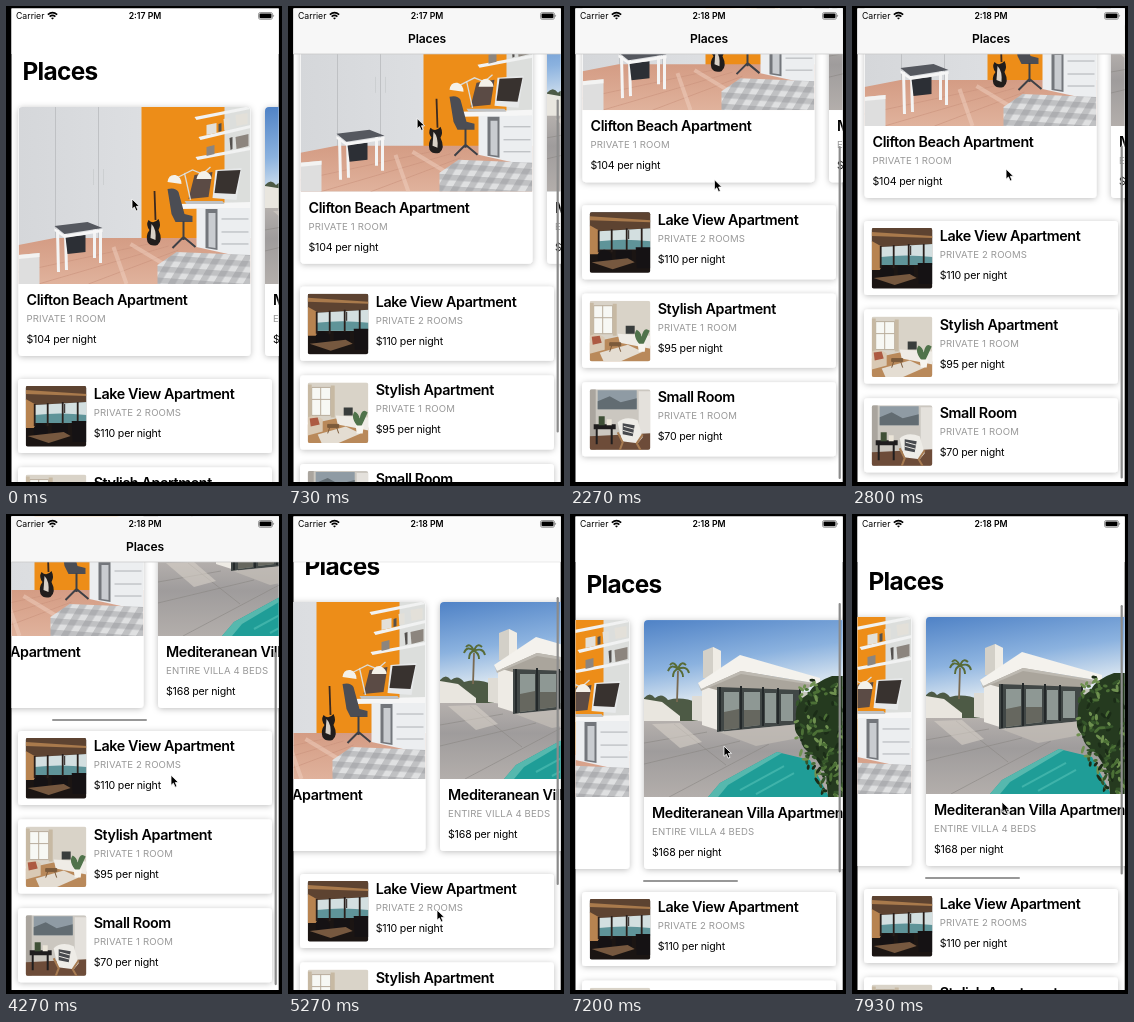
Animation of 276x480 px, one loop 8000 ms. Source, as an HTML page:

```html
<!DOCTYPE html>
<html lang="en">
<head>
<meta charset="utf-8">
<title>Places</title>
<style>
html, body { margin: 0; width: 100%; height: 100%; overflow: hidden; background: #000; }
svg { display: block; width: 276px; height: 480px; }
text { font-family: Inter, "Liberation Sans", sans-serif; dominant-baseline: alphabetic; }
.large { font-size: 24.4px; font-weight: 700; letter-spacing: -.7px; }
.name { font-size: 14.3px; font-weight: 600; letter-spacing: -.38px; }
.kind { font-size: 9.6px; fill: #999; letter-spacing: .13px; }
.price { font-size: 10.6px; letter-spacing: -.18px; }
.bar { font-size: 12.1px; font-weight: 600; letter-spacing: -.15px; text-anchor: middle; }
.status { font-size: 8.7px; }
</style>
</head>
<body>
<svg viewBox="0 0 276 480">
  <defs>
    <clipPath id="screen"><rect x="5.5" y="2.5" width="267.2" height="473.5"/></clipPath>
    <clipPath id="photo"><path d="M0 177V4Q0 0 4 0H228Q232 0 232 4V177Z"/></clipPath>
    <clipPath id="thumb"><rect width="60.5" height="60.5" rx="2"/></clipPath>
    <filter id="shadow" x="-10%" y="-20%" width="120%" height="140%">
      <feDropShadow dx="0" dy="1" stdDeviation="3.3" flood-opacity=".26"/>
    </filter>
    <linearGradient id="sky" x2=".2" y2="1">
      <stop stop-color="#4f82c6"/><stop offset=".28" stop-color="#8bb2df"/><stop offset=".5" stop-color="#e2ebf2"/>
    </linearGradient>
    <linearGradient id="patio" x2="0" y2="1">
      <stop stop-color="#b5b0ad"/><stop offset=".4" stop-color="#9f9c9c"/><stop offset="1" stop-color="#b3aeab"/>
    </linearGradient>
    <linearGradient id="wall" x2="1" y2="0">
      <stop stop-color="#d5d7da"/><stop offset="1" stop-color="#e3e5e8"/>
    </linearGradient>
    <linearGradient id="floor" x2="0" y2="1">
      <stop stop-color="#d49c84"/><stop offset="1" stop-color="#e0b29c"/>
    </linearGradient>
    <pattern id="checks" width="15" height="11" patternUnits="userSpaceOnUse" patternTransform="skewX(-28) rotate(4)">
      <rect width="15" height="11" fill="#dfe0e1"/>
      <path d="M0 0H7.5V11H0Z" fill="#8d8f94" fill-opacity=".38"/>
      <path d="M0 0H15V5.5H0Z" fill="#8d8f94" fill-opacity=".38"/>
    </pattern>

    <g id="room" clip-path="url(#photo)">
      <rect width="232" height="177" fill="url(#wall)"/>
      <path d="M37 0V133M80 0V132" stroke="#bfc1c4"/>
      <path d="M75 62V78M85 62V78" stroke="#cccfd1"/>
      <path d="M123 0H208V135H123Z" fill="#ed8d18"/>
      <path d="M206 0H232V130H206Z" fill="#dcdedc"/>
      <path d="M0 138L36 131H232V177H0Z" fill="url(#floor)"/>
      <path d="M0 165L130 137M20 177L150 139M70 177L160 143" stroke="#c9937c" stroke-width=".6"/>
      <path d="M95 140L108 177M112 137L150 160" stroke="#efd0c0" stroke-width="4" opacity=".5"/>
      <path d="M0 148L21 146V177H0Z" fill="#dedede"/><path d="M0 148L21 146V150L0 152Z" fill="#f3f3f2"/>
      <path d="M176 10L232 -1V2L178 13Z M180 30L232 18V21L182 33Z M177 50L232 40V43L179 53Z" fill="#f1f2f2"/>
      <path d="M188 18L198 16V26L188 28Z M205 12L211 11V22L206 23Z M217 8L229 6V17L218 19Z" fill="#e3e0d9"/>
      <path d="M188 40L196 38V47L188 49Z M217 30L230 27V39L218 42Z" fill="#8c857e"/>
      <path d="M200 17L203 16V24L200 25Z M211 31L214 30V42L212 43Z" fill="#54514e"/>
      <path d="M136 84L137 113" stroke="#3c2a20" stroke-width="1.8"/>
      <path d="M130 113Q135 118 140 112Q143 118 140 123Q145 133 139 138Q132 140 129 135Q127 128 131 123Q127 118 130 113Z" fill="#211d1c"/>
      <path d="M133 117Q138 122 137 133L132 131Z" fill="#d8d0c6"/>
      <path d="M160 97L232 95V101L160 102Z" fill="#f6f6f6"/>
      <path d="M178 101H232V152L178 140Z" fill="#eceef0"/>
      <path d="M187 102H199V143L187 141Z" fill="#73767b"/>
      <path d="M190 106H197V141L190 140Z" fill="#c9ccd0"/>
      <path d="M203 112H230M203 125H230M203 137H230" stroke="#aeb1b5"/>
      <path d="M197 63L223 61L218 93L194 91Z" fill="#e7e9ea"/>
      <path d="M199 64L222 63L217 87L196 86Z" fill="#38322f"/>
      <path d="M176 68L194 65L190 90L170 92Z" fill="#5b4b45"/>
      <path d="M166 94H204L206 97H168Z" fill="#c0c2c4"/>
      <path d="M149 82Q157 80 160 85L166 107L174 109V115H157L153 107Z" fill="#4b4d54"/>
      <path d="M165 114V133M165 130L154 141M165 130L177 140" stroke="#3e4046" stroke-width="2"/>
      <path d="M156 72L174 63L184 67L192 60M166 66L172 93" fill="none" stroke="#dcdcd8" stroke-width="1.3"/>
      <path d="M149 75Q150 67 157 68Q163 70 163 77Z M178 72Q180 63 187 64Q193 67 193 72Z" fill="#f4f1e9"/>
      <path d="M39 123L40 165M47 127L48 163M76 120V151M82 123V156" stroke="#f4f4f4" stroke-width="3"/>
      <path d="M47 130L67 128V145L49 147Z" fill="#2c2f35"/>
      <path d="M36 119L69 115L84 121L46 127Z" fill="#55585f"/>
      <path d="M36 121L46 128L84 122V125L46 131L36 124Z" fill="#f6f6f6"/>
      <path d="M139 158L158 145L232 148V177H139Z" fill="url(#checks)"/>
    </g>

    <g id="villa" clip-path="url(#photo)">
      <rect width="232" height="177" fill="url(#sky)"/>
      <path d="M0 78Q6 71 11 78Q18 72 24 80Q38 76 54 83V102H0Z" fill="#4d5a45"/>
      <path d="M0 79L18 82L36 96V103H0Z" fill="#e9e6df"/>
      <path d="M34 51L33 82" stroke="#7a6a52" stroke-width="1.8"/>
      <path d="M34 49Q27 43 24 51M34 49Q30 40 26 45M34 49Q37 40 42 45M34 49Q43 45 45 53M34 49Q29 50 29 57M34 49Q39 51 39 57" fill="none" stroke="#586b37" stroke-width="1.9"/>
      <path d="M59 31L69 27L77 31V58H59Z" fill="#d3d0c8"/><path d="M69 27L77 31V55H69Z" fill="#efece5"/>
      <path d="M0 101H232V177H0Z" fill="url(#patio)"/>
      <path d="M155 72H190V103H155Z" fill="#c9c9c2"/>
      <path d="M48 76H62V102L48 100Z" fill="#dfdcd5"/>
      <path d="M58 66H80V112L58 105Z" fill="#eeebe5"/>
      <path d="M58 66L97 50L170 65L158 71H76Z" fill="#aaa59c"/>
      <path d="M73 67L156 70V104L73 112Z" fill="#414746"/>
      <path d="M80 72H95V108L80 110Z M100 72H116V105L100 107Z M121 73H132V103H121Z M137 74H149V101H137Z" fill="#8e9894"/>
      <path d="M80 92L95 89V108L80 110Z M100 90H116V105L100 107Z" fill="#66675f"/>
      <path d="M76 67V111M97 66V109M119 67V106M134 68V104M156 69V104" stroke="#24292a" stroke-width="2"/>
      <path d="M54 63L96 35L176 58V64L97 51L57 69Z" fill="#f4f2ed"/>
      <path d="M54 63L57 69L97 51L176 64V66L97 54L57 71Z" fill="#bdb9b1"/>
      <path d="M0 123L63 112M0 144L96 121M25 177L125 124M30 104L82 145" stroke="#8a8684" stroke-width=".6"/>
      <path d="M8 104L36 103L58 122L36 128Z" fill="#d8d1c9" opacity=".6"/>
      <path d="M75 112L156 104L160 117L112 126Z" fill="#c5bfb8" opacity=".7"/>
      <path d="M64 177L76 163L133 132L166 140L185 177Z" fill="#1f9d97"/>
      <path d="M64 177L76 163L133 132L138 133L84 165L74 177Z" fill="#56b8ae"/>
      <path d="M96 170L140 146M112 174L150 153" stroke="#3fb3aa" stroke-width="2"/>
      <path d="M188 56Q170 62 164 74Q150 82 152 98Q148 112 157 118Q156 128 170 136Q176 146 182 154L184 177H232V56Z" fill="#253a1f"/>
      <g id="leaves"></g>
    </g>

    <g id="lake" clip-path="url(#thumb)">
      <rect width="61" height="61" fill="#1b1513"/>
      <path d="M0 0H61V16L9 19L0 14Z" fill="#5d4331"/>
      <path d="M0 4L61 8V10L0 8Z" fill="#a97a4c"/>
      <path d="M9 19L61 16V37H9Z" fill="#d3dfe0"/>
      <path d="M9 29Q34 26 61 29V37H9Z" fill="#5f9499"/>
      <path d="M0 13L9 18V42H0Z" fill="#b78350"/>
      <path d="M9 18V40M22 17V40M37 16V40M52 16V40" stroke="#291f1b" stroke-width="1.8"/>
      <path d="M8 42Q14 33 22 42V51H8Z M26 38H42V50H26Z M46 35H61V56H47Z" fill="#151214"/>
      <path d="M2 50L38 46L45 50L23 57Z" fill="#76583f"/>
      <path d="M39 18V27" stroke="#211815"/>
    </g>

    <g id="stylish" clip-path="url(#thumb)">
      <rect width="61" height="61" fill="#d9d3c8"/>
      <path d="M4 5H23V33H4Z" fill="#f7f8f4"/><path d="M4 5H23V33H4ZM13 5V33M4 17H23" fill="none" stroke="#b9ad9c"/>
      <path d="M0 2H4V40H0Z M23 3H27V35H23Z" fill="#c7b9a3"/>
      <path d="M0 42L28 36L61 45V61H0Z" fill="#b9895a"/>
      <path d="M10 52L38 44L53 51L30 61H14Z" fill="#e4ddd2"/>
      <path d="M0 35Q8 31 15 37V49L0 53Z" fill="#d9c9b4"/><path d="M2 36L10 35L12 42L3 44Z" fill="#ad5a42"/>
      <path d="M28 33L61 35V48L30 42Z" fill="#efece6"/><path d="M36 25H45V33H36Z" fill="#393d3c"/>
      <path d="M51 45Q42 35 47 29Q51 31 52 36Q54 25 60 30Q56 39 53 45Z" fill="#50734b"/>
      <path d="M48 43H56L55 51H49Z" fill="#f7f5ef"/>
      <path d="M20 42H31V45H20ZM22 45L20 51M29 45L31 51" fill="#7b5a3b" stroke="#7b5a3b"/>
    </g>

    <g id="small" clip-path="url(#thumb)">
      <rect width="61" height="61" fill="#cbc7c0"/>
      <path d="M0 0H6V61H0Z" fill="#aaa59e"/>
      <path d="M8 1H47V20H8Z" fill="#8f9ba4"/><path d="M8 12L20 7L31 13L47 9V20H8Z" fill="#626c72"/>
      <path d="M49 2H61V48H49Z" fill="#e4e1dc"/>
      <path d="M0 47L61 44V61H0Z" fill="#6d4c39"/>
      <path d="M5 36H25V39H5ZM7 39V55M22 39V55" fill="#1f1d1e" stroke="#1f1d1e" stroke-width="2"/>
      <path d="M9 27H15V36H9Z" fill="#3f5037"/><path d="M17 30H22V36H17Z" fill="#ebe5d8"/>
      <path d="M28 33Q36 26 48 31L53 48L48 54L32 52Z" fill="#eeece7"/>
      <path d="M33 34L45 36L43 47L33 45Z" fill="#47494d"/><path d="M34 37L45 40M33 41L44 44" stroke="#e7e5e0"/>
      <path d="M28 43L33 53L30 61M53 45L47 54L51 61" fill="none" stroke="#a77b51" stroke-width="2"/>
    </g>
  </defs>

  <rect width="276" height="480"/>
  <g clip-path="url(#screen)">
    <rect x="5" y="2" width="268" height="474" fill="#fff"/>
    <g id="page">
      <text class="large" x="16.5" y="74">Places</text>
      <g id="cards"></g>
      <rect id="hbar" y="361" width="95" height="2" rx="1" fill="#979797"/>
      <g id="rows"></g>
    </g>
    <rect id="vbar" x="268.6" width="2.2" rx="1.1" fill="#8b8b8b"/>
    <rect x="5" y="2" width="268" height="46" fill="#fff"/>
    <g id="nav">
      <rect x="5" y="2" width="268" height="46" fill="#f7f7f7"/>
      <path d="M5 48H273" stroke="#c4c4c4" stroke-width=".7"/>
    </g>
    <text id="navTitle" class="bar" x="139" y="36.5">Places</text>
    <text class="status" x="10" y="13">Carrier</text>
    <path d="M41.8 8.6Q46.5 4.6 51.2 8.6M43.6 10.6Q46.5 8.2 49.4 10.6" fill="none" stroke="#000" stroke-width="1.5"/>
    <path d="M45 12L46.5 13.6L48 12Q46.5 10.8 45 12Z"/>
    <text id="clock" class="status" x="139" y="13" text-anchor="middle" font-weight="600"></text>
    <rect x="252.5" y="6.5" width="14" height="6.8" rx="1.8" fill="#fff" stroke="#555" stroke-width=".6"/>
    <rect x="253.5" y="7.5" width="12" height="4.8" rx="1"/>
    <path d="M267.4 8.6Q269 9.9 267.4 11.2Z" fill="#555"/>
  </g>
  <path id="cursor" d="M0 0V10.2L2.4 8L4.1 12L6 11.2L4.3 7.3H7.5Z" stroke="#fff" stroke-width=".8"/>
</svg>
<script>
const $ = id => document.getElementById(id);
const LOOP = 8000;
const clamp = v => Math.max(0, Math.min(1, v));
const set = (id, attributes) => {
  for (const [key, value] of Object.entries(attributes)) $(id).setAttribute(key, value);
};

const label = (x, y, name, kind, price) => `
  <text class="name" x="${x}" y="${y}">${name}</text>
  <text class="kind" x="${x}" y="${y + 17}">${kind}</text>
  <text class="price" x="${x}" y="${y + 38}">$${price} per night</text>`;

const card = (x, art, ...info) => `<g transform="translate(${x} 101)">
  <rect width="232" height="249" rx="4" fill="#fff" filter="url(#shadow)"/>
  <use href="#${art}"/>${label(8, 198, ...info)}</g>`;

const row = (i, art, ...info) => `<g transform="translate(12 ${373 + i * 88.6})">
  <rect width="254" height="74" rx="3.5" fill="#fff" filter="url(#shadow)"/>
  <use href="#${art}" x="7.7" y="7"/>${label(75.7, 20, ...info)}</g>`;

$('cards').innerHTML =
  card(12.5, 'room', 'Clifton Beach Apartment', 'PRIVATE 1 ROOM', 104) +
  card(259, 'villa', 'Mediteranean Villa Apartment', 'ENTIRE VILLA 4 BEDS', 168);
$('rows').innerHTML =
  row(0, 'lake', 'Lake View Apartment', 'PRIVATE 2 ROOMS', 110) +
  row(1, 'stylish', 'Stylish Apartment', 'PRIVATE 1 ROOM', 95) +
  row(2, 'small', 'Small Room', 'PRIVATE 1 ROOM', 70);

// Leaves fill a rounded bush whose ragged left side leans over the pool.
let seed = 7;
const random = () => (seed = seed * 16807 % 2147483647) / 2147483647;
const greens = ['#35552a', '#4c7036', '#6f9150', '#1b2c17'];
$('leaves').innerHTML = Array.from({ length: 170 }, (_, i) => {
  const y = 60 + random() * 116;
  const x = 148 + Math.abs(y - 102) ** 1.6 / 30 + random() * 55;
  return `<ellipse rx="${2 + random() * 2.5}" ry="1.5" fill="${greens[i % 4]}"
    transform="translate(${x} ${y}) rotate(${random() * 180})"/>`;
}).join('');

// Smooth curve through [time, value] points that never overshoots them.
function track(points) {
  const rate = i => (points[i + 1][1] - points[i][1]) / (points[i + 1][0] - points[i][0]);
  const slopes = points.map((_, i) => {
    if (!i || i === points.length - 1) return 0;
    const a = rate(i - 1), b = rate(i);
    return a * b > 0 ? 2 * a * b / (a + b) : 0;
  });
  return t => {
    let i = 0;
    while (i < points.length - 2 && t >= points[i + 1][0]) i++;
    const [t0, v0] = points[i], [t1, v1] = points[i + 1];
    const d = t1 - t0, u = clamp((t - t0) / d), w = 1 - u;
    return v0 * w * w * (1 + 2 * u) + v1 * u * u * (3 - 2 * u)
      + d * u * w * (slopes[i] * w - slopes[i + 1] * u);
  };
}

const scrollY = track([[0, 0], [350, 26], [700, 88], [1000, 121], [1400, 137], [1800, 141],
  [2250, 174], [2500, 165], [2800, 158], [3050, 156], [4300, 156], [4850, 28], [5200, 13],
  [6950, 13], [7200, -5], [7480, -22], [7700, -7], [7930, -2], [8000, -1]]);
const scrollX = track([[2850, 0], [3500, 80], [3900, 102], [4230, 107],
  [5600, 107], [6200, 166], [6500, 181], [6850, 185]]);
const cursorX = track([[0, 126], [700, 129], [1800, 134], [2300, 145], [2800, 154], [2960, 195],
  [3550, 112], [4270, 165], [5270, 149], [5650, 188], [6250, 125], [7200, 154], [7930, 150]]);
const cursorY = track([[0, 193], [700, 112], [1700, 266], [1800, 266], [2300, 172], [2800, 163],
  [3550, 156], [4270, 261], [4850, 389], [5270, 396], [5650, 222], [6250, 216], [6950, 214],
  [7200, 232], [7500, 284], [7930, 288]]);
const vFade = track([[60, 0], [180, 1], [5500, 1], [5800, 0], [6950, 0], [7050, 1]]);
const hFade = track([[2860, 0], [2960, 1], [4500, 1], [4800, 0], [5600, 0], [5700, 1]]);

// The scroll bar grows as the large title collapses under the header.
function scrollBar(y) {
  const header = Math.min(91, Math.max(48, 91 - y));
  const bottom = Math.min(362 + y * .7, 473);
  const top = bottom - (476 - header) ** 2 / 550;
  return { y: top, height: bottom - top };
}

function draw(now) {
  const t = now % LOOP, y = scrollY(t), x = scrollX(t);
  set('page', { transform: `translate(0 ${-y})` });
  set('cards', { transform: `translate(${-x} 0)` });
  set('hbar', { x: 9 + x * .346, opacity: hFade(t) });
  set('vbar', { ...scrollBar(y), opacity: vFade(t) });
  set('nav', { opacity: clamp(y / 26) });
  set('navTitle', { opacity: clamp((y - 24) / 8) });
  set('cursor', { transform: `translate(${cursorX(t)} ${cursorY(t)})` });
  $('clock').textContent = t < 1300 ? '2:17 PM' : '2:18 PM';
}

const start = performance.now();
function tick() {
  draw(performance.now() - start);
  requestAnimationFrame(tick);
}
tick();
</script>
</body>
</html>
```
